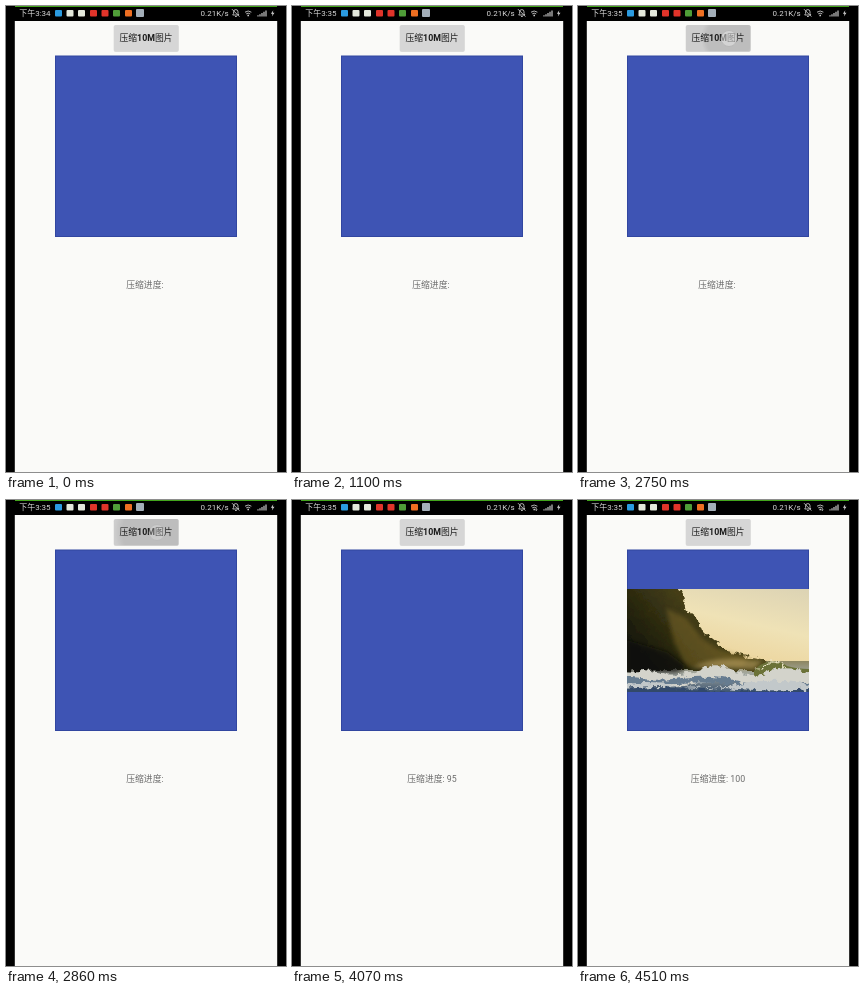
Write an HTML page that moves like this. It is 280x466 px and loops after 4620 ms.

```html
<!DOCTYPE html>
<html lang="zh-CN">
<head>
<meta charset="utf-8">
<title>压缩图片</title>
<style>
html, body { margin: 0; width: 100%; height: 100%; overflow: hidden; background: #000; }
svg { display: block; width: 280px; height: 466px; }
text { font-family: Roboto, "Noto Sans CJK SC", "Noto Sans CJK", sans-serif; white-space: pre; }
.status { font-size: 8px; fill: #d8d8d8; }
.body { font-size: 8.8px; text-anchor: middle; }
.cursor, .ripple, .wave, .photo, .traffic { animation: 4620ms step-end infinite; }
.cursor { animation-name: cursor; }
.ripple { animation-name: ripple; }
.wave { animation-name: wave; transform-origin: 151px 32px; }
.photo { animation-name: photo; }
.traffic { animation-name: traffic; }
@keyframes cursor {
  0% { opacity: 0; }
  52.381% { opacity: 1; }
  59.524% { opacity: .75; }
  61.905% { opacity: .45; }
  66.667%, 100% { opacity: 0; }
}
@keyframes ripple {
  0% { opacity: 0; }
  57.143% { opacity: 1; }
  78.571% { opacity: .7; }
  80.952% { opacity: .35; }
  83.333%, 100% { opacity: 0; }
}
@keyframes wave {
  0% { transform: scale(.2); }
  57.143% { transform: scale(.35); }
  59.524% { transform: scale(.65); }
  61.905% { transform: scale(.98); }
  66.667%, 100% { transform: scale(1.5); }
}
@keyframes photo {
  0% { opacity: 0; }
  95.238%, 100% { opacity: 1; }
}
@keyframes traffic {
  0% { opacity: 0; }
  78.571%, 100% { opacity: 1; }
}
</style>
</head>
<body>
<svg viewBox="0 0 280 466">
  <defs>
    <clipPath id="btn"><rect x="108" y="19" width="64.5" height="26.5" rx="1.5"/></clipPath>
    <clipPath id="frame"><rect x="49" y="89" width="182" height="103"/></clipPath>
    <radialGradient id="soft">
      <stop offset=".8" stop-opacity=".08"/>
      <stop offset="1" stop-opacity="0"/>
    </radialGradient>
    <linearGradient id="sky" x1="1" y1="0" x2=".6" y2="1">
      <stop offset="0" stop-color="#dcd3b4"/>
      <stop offset=".4" stop-color="#efe2b6"/>
      <stop offset="1" stop-color="#eacb8a"/>
    </linearGradient>
    <linearGradient id="cliff" x1="0" y1=".6" x2=".6" y2=".3">
      <stop offset="0" stop-color="#14150b"/>
      <stop offset=".4" stop-color="#2c2a10"/>
      <stop offset="1" stop-color="#51481a"/>
    </linearGradient>
    <linearGradient id="sea" x1="0" y1="0" x2="0" y2="1">
      <stop offset="0" stop-color="#8d8660"/>
      <stop offset=".4" stop-color="#a3a8a0"/>
      <stop offset="1" stop-color="#3d5470"/>
    </linearGradient>
    <filter id="blur" x="-20%" y="-40%" width="140%" height="180%"><feGaussianBlur stdDeviation="2"/></filter>
    <filter id="rough" x="-10%" y="-30%" width="120%" height="160%">
      <feTurbulence type="fractalNoise" baseFrequency=".16" numOctaves="3" seed="4"/>
      <feDisplacementMap in="SourceGraphic" scale="9" xChannelSelector="R" yChannelSelector="G"/>
    </filter>
  </defs>

  <rect width="280" height="466"/>
  <rect x="8.8" y="15" width="262.4" height="451" fill="#fafaf8"/>
  <rect x="9" width="262" height="1" fill="#43a51c"/>

  <!-- status bar -->
  <text id="clock" class="status" x="13.2" y="10">下午3:34</text>
  <g>
    <rect x="49" y="4" width="7" height="6.5" rx="1" fill="#2b9be0"/>
    <rect x="60.5" y="4" width="7" height="6.5" rx="1" fill="#e4e8dc"/>
    <rect x="72" y="4" width="7" height="6.5" rx="1" fill="#e4e8dc"/>
    <rect x="84" y="4" width="7" height="6.5" rx="1" fill="#e0342a"/>
    <rect x="95.5" y="4" width="7" height="6.5" rx="1" fill="#e0342a"/>
    <rect x="107" y="4" width="7" height="6.5" rx="1" fill="#4f9d38"/>
    <rect x="119" y="4" width="7" height="6.5" rx="1" fill="#ee6f22"/>
    <rect x="130" y="3" width="8" height="8" rx="1" fill="#a3aeb8"/>
  </g>
  <text class="status" x="194.6" y="10">0.21K/s</text>
  <g fill="none" stroke="#c8c8c8" stroke-width=".9">
    <path d="M226.7 9h6.2l-.9-1.4v-1.8a2.2 2.2 0 0 0-4.4 0v1.8zM229 10.5h1.8M226 3.2l7.4 7.4"/>
    <path d="M239 6.2q3.2-2.4 6.4 0M240.2 7.9q2-1.5 4 0"/>
    <path d="M241.4 9.5h1.6" stroke-width="1.4"/>
    <path class="traffic" d="M244.3 7.6v3M243.3 9.4l1 1.2 1-1.2" stroke-width=".7"/>
    <path d="M252 10.6V9.2M254 10.6V8.2M256 10.6V7M258 10.6V5.8M260 10.6V4.4" stroke-width="1.2"/>
  </g>
  <path d="M267.3 4.2l-2.4 3.6h1.6l-.6 2.8 2.6-3.8h-1.7z" fill="#d4d4d4"/>

  <!-- button -->
  <rect x="107.6" y="19.2" width="65.2" height="26.8" rx="2" fill="#c6c6c5" opacity=".5"/>
  <rect x="108" y="19" width="64.5" height="26.5" rx="1.5" fill="#d6d6d6"/>
  <g clip-path="url(#btn)">
    <g class="ripple">
      <rect x="108" y="19" width="65" height="27" opacity=".04"/>
      <circle class="wave" cx="151" cy="32" r="44" fill="url(#soft)"/>
    </g>
  </g>
  <text class="body" x="140" y="35.3" font-weight="500" fill="#1c1c1c">压缩<tspan font-weight="700">10M</tspan>图片</text>
  <circle class="cursor" cx="151" cy="32.5" r="8" fill="#e6e6e6" fill-opacity=".72" stroke="#b4b4b4" stroke-width=".9"/>

  <!-- image view -->
  <rect x="49.5" y="50" width="181" height="180.5" fill="#3e54b4" stroke="#3146a0"/>
  <g class="photo">
    <g clip-path="url(#frame)">
      <rect x="49" y="89" width="182" height="103" fill="url(#sky)"/>
      <rect x="49" y="161" width="182" height="31" fill="url(#sea)"/>
      <path d="M40 80H97l3 9 5 7 2 9 5 8 9 8 4 10 9 8 10 7 5 6 15 3 20 4 14 5-20 6H40z" fill="url(#cliff)" filter="url(#rough)"/>
      <path d="M88 108l20 10 16 20 18 12 28 8-4 8H108L96 142z" fill="#87702b" opacity=".45" filter="url(#blur)"/>
      <path d="M49 140l40 12 20 15-10 6H49z" fill="#0e1009" opacity=".7" filter="url(#blur)"/>
      <path d="M112 168q20-10 46-9l26 2-8 8z" fill="#cdb171" opacity=".5" filter="url(#blur)"/>
      <path d="M176 171q6-8 17-10 10 0 16 5 10 3 22 3v8h-55z" fill="#6b7238"/>
      <g filter="url(#rough)">
        <path d="M45 172q20-4 40 1t36-3 36 1 34 1 45 1v8q-30 5-64 2t-66 2-61-2z" fill="#d3d3cb"/>
        <path d="M45 177q30 5 60 1t60 4 71-2v4q-40 4-80 0t-111 2z" fill="#667b90"/>
        <path d="M45 184q30-3 56 2t60-2 75 1v4q-40 3-90-1t-101 1z" fill="#c2c8ca"/>
        <path d="M45 189q40-3 80 1t111-1v9H45z" fill="#33496a"/>
        <path d="M180 170q8-9 16-8t12 7" fill="none" stroke="#ece5c8" stroke-width="1.2"/>
      </g>
    </g>
  </g>

  <text id="label" class="body" x="140" y="282.2" fill="#6c6c6c"></text>
</svg>
<script>
const LOOP = 4620, MINUTE = 1100;
const clock = document.getElementById('clock');
const label = document.getElementById('label');
// [start in ms, progress]
const progress = [[0, ''], [3300, 10], [3410, 20], [3630, 40], [3740, 55],
                  [3850, 70], [3960, 85], [4070, 95], [4400, 100]];
let start;

function setText(el, text) {
  if (el.textContent !== text) el.textContent = text;
}

function tick(now) {
  start ??= now;
  const t = (now - start) % LOOP;
  const value = progress.findLast(([from]) => t >= from)[1];
  setText(clock, t < MINUTE ? '下午3:34' : '下午3:35');
  setText(label, '压缩进度:\u00a0' + value);
  requestAnimationFrame(tick);
}
requestAnimationFrame(tick);
</script>
</body>
</html>
```
